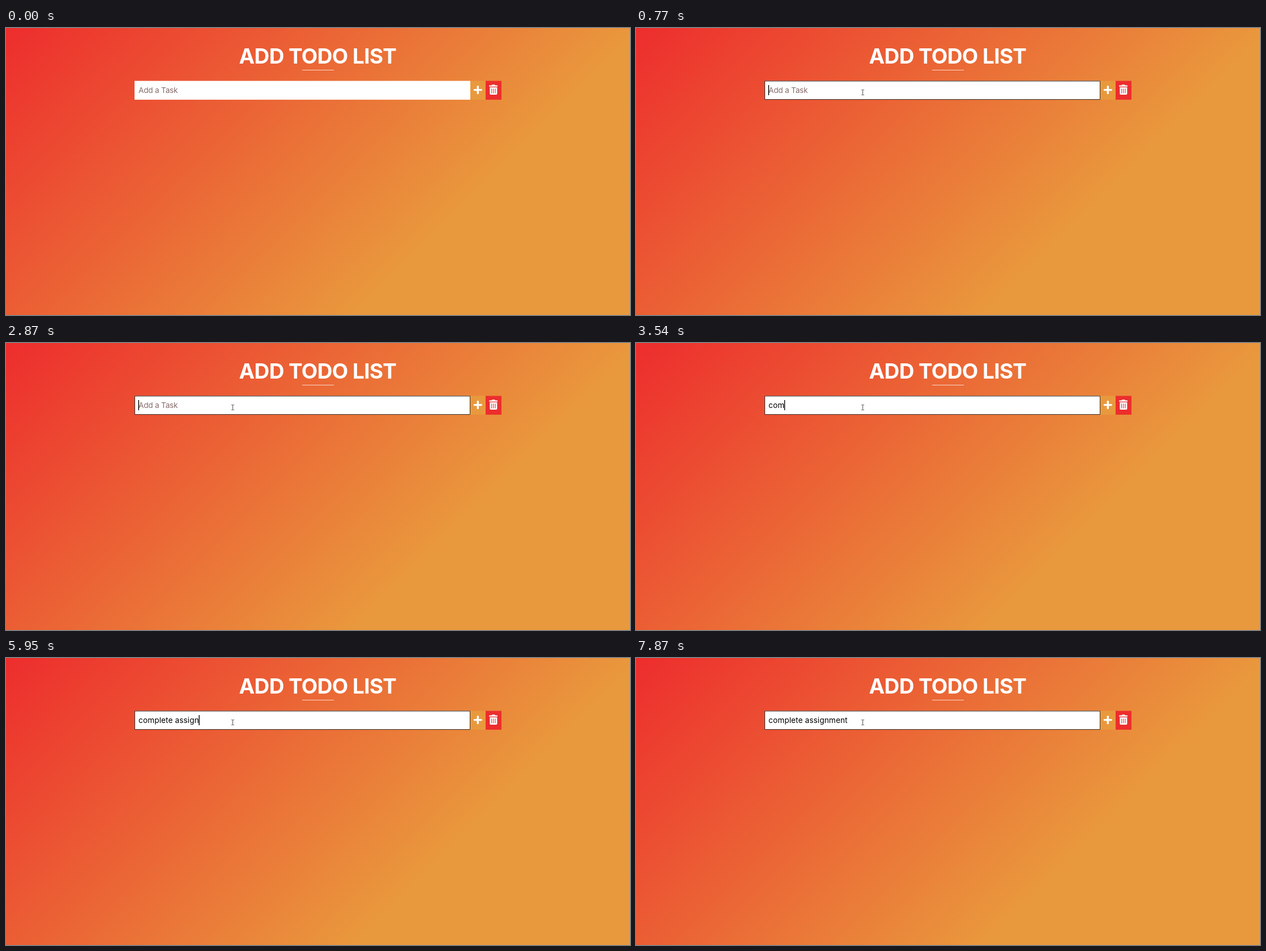
Recreate the animation shown at these times as an HTML page. Size 1102x508 px, loop 8 s.

```html
<!DOCTYPE html>
<html lang="en">
<head>
<meta charset="utf-8">
<title>Add Todo List</title>
<style>
  :root { --red: #ed2d2d; --amber: #e9993d; }
  html, body { margin: 0; width: 100%; height: 100%; overflow: hidden; }
  body { background: linear-gradient(135deg, var(--red), var(--amber) 70%); }
  svg { display: block; width: 100%; height: 100%; }
  text { font-family: Inter, "Open Sans", sans-serif; white-space: pre; }
  .title { font-size: 37px; font-weight: 700; letter-spacing: -0.62px; fill: #fff; text-anchor: middle; }
  .field { font-size: 13.6px; letter-spacing: 0.12px; }
  .hint { fill: #856c69; letter-spacing: -0.2px; }
</style>
</head>
<body>
<svg viewBox="0 0 1102 508">
  <text class="title" x="550.5" y="62.5">ADD TODO LIST</text>
  <rect x="523" y="74.2" width="56" height="0.75" fill="#fff"/>

  <rect x="227" y="93.6" width="593" height="33.3" fill="#fff"/>
  <rect id="focus" x="227.4" y="94" width="592.2" height="32.5" fill="none" stroke="#000" stroke-width="0.8"/>
  <text id="hint" class="field hint" x="234" y="114.7">Add a Task</text>
  <text id="typed" class="field" x="234" y="114.7"></text>
  <rect id="caret" y="101" width="1.4" height="18"/>

  <rect x="820" y="93.6" width="27" height="33.3" fill="var(--amber)"/>
  <path d="M833.3 103.6V115.6M827.3 109.6H839.3" stroke="#fff" stroke-width="3.4" stroke-linecap="round"/>

  <rect x="847" y="93.6" width="28" height="33.3" fill="var(--red)"/>
  <g fill="#fff">
    <path d="M853.8 101.4h3.9l.9-1.1h4.6l.9 1.1h3.3q.6 0 .6.6v1.2q0 .6-.6.6h-13.6q-.6 0-.6-.6v-1.2q0-.6.6-.6z"/>
    <path d="M854.4 105h13v11.2q0 1.8-1.8 1.8h-9.4q-1.8 0-1.8-1.8z"/>
  </g>
  <path d="M857.7 107.6v7.6M860.9 107.6v7.6M864.1 107.6v7.6" stroke="var(--red)" stroke-width="1.1" stroke-linecap="round"/>

  <path id="arrow" d="M.5.5v10.2l2.3-2.1 1.6 3.7 1.7-.7-1.6-3.6h3z" fill="#fff" stroke="#222" stroke-width=".9"/>
  <path id="beam" d="M-2.3-4.5H-.6L0-4 .6-4.5H2.3M0-4V4M-2.3 4.5H-.6L0 4 .6 4.5H2.3" fill="none" stroke="#333" stroke-width=".85"/>
</svg>
<script>
const LOOP = 8000, BLINK = 520, FOCUS = 770, LEFT = 234;

// typing comes in bursts of evenly spaced keys
const bursts = [
  { at: 3250, gap: 137, text: "compl" },
  { at: 4520, gap: 120, text: "ete " },
  { at: 5140, gap: 117, text: "assi" },
  { at: 5690, gap: 260, text: "gn" },
  { at: 6970, gap: 120, text: "ment" }
];
const keys = bursts.flatMap(({ at, gap, text }) =>
  [...text].map((char, i) => ({ char, time: at + i * gap })));

// the pointer sweeps in and eases to rest, in held steps
const move = { at: 240, step: 30, steps: 13, from: [980, 494], to: [401, 114], ease: [7.3, 2.5] };

const [focus, hint, typed, caret, arrow, beam] =
  ["focus", "hint", "typed", "caret", "arrow", "beam"].map(id => document.getElementById(id));
const show = (node, on) => node.setAttribute("visibility", on ? "visible" : "hidden");

function drawPointer(t) {
  const i = Math.floor((t - move.at) / move.step);
  const left = 1 - Math.min(1, Math.max(0, i / move.steps));
  const [x, y] = move.to.map((end, k) => end + (move.from[k] - end) * left ** move.ease[k]);
  const over = x > 227 && x < 820 && y > 94 && y < 127;
  show(arrow, i >= 0 && !over);
  show(beam, i >= 0 && over);
  arrow.setAttribute("transform", `translate(${x} ${y})`);
  beam.setAttribute("transform", `translate(${x - 0.5} ${y})`);
}

function drawField(t) {
  const done = keys.filter(k => k.time <= t);
  const since = done.length ? done[done.length - 1].time : FOCUS;
  typed.textContent = done.map(k => k.char).join("");
  show(focus, t >= FOCUS);
  show(hint, !done.length);
  show(caret, t >= FOCUS && Math.floor((t - since) / BLINK) % 2 === 0);
  caret.setAttribute("x", LEFT - 0.4 + typed.getComputedTextLength());
}

const start = performance.now();
function frame() {
  const t = (performance.now() - start) % LOOP;
  drawPointer(t);
  drawField(t);
  requestAnimationFrame(frame);
}
frame();
</script>
</body>
</html>
```
